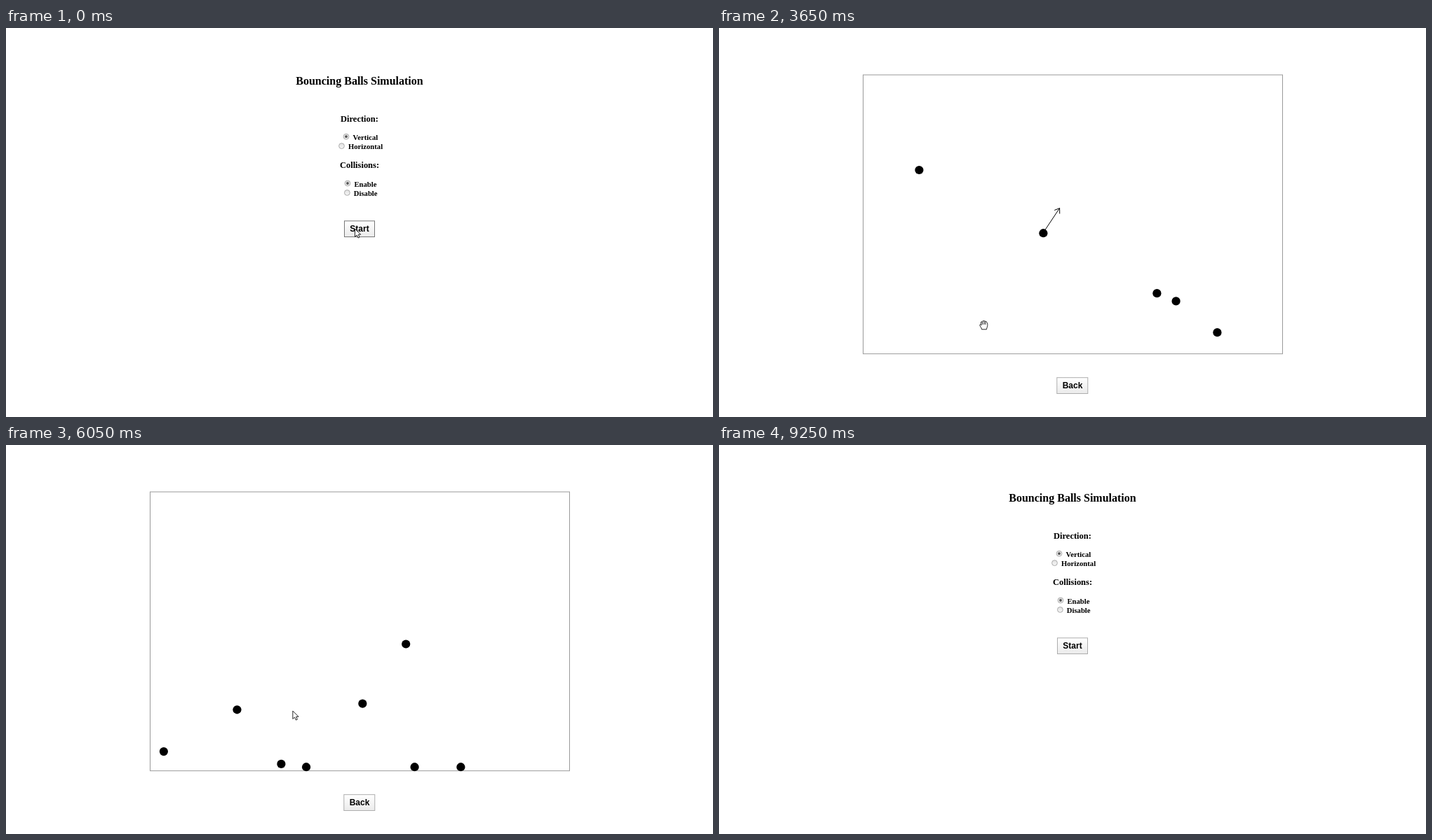
Write an HTML page that moves like this. It is 1008 px wide and 556 px high and loops after 9.9 s.

```html
<!DOCTYPE html>
<html lang="en">
<head>
<meta charset="utf-8">
<title>Bouncing Balls Simulation</title>
<style>
  html, body { margin: 0; width: 100%; height: 100%; overflow: hidden; background: #fff; }
  svg { display: block; width: 1008px; height: 556px; }
  text { font: bold 10.67px "Liberation Serif", "Times New Roman", serif; }
  .title { font-size: 16px; }
  .head { font-size: 12.48px; }
  .mid { text-anchor: middle; }
  .btn text { font: bold 12px "Liberation Sans", Arial, sans-serif; text-anchor: middle; }
  .btn rect { fill: url(#face); stroke: #adadad; }
  .btn.hover rect { stroke: #777; }
  .btn.down rect { fill: #e4e4e4; }
  .radio { fill: url(#knob); stroke: #a2a2a2; stroke-width: .9; }
  .line { fill: none; stroke: #000; }
  .pointer { fill: #fff; stroke: #000; stroke-width: .85; stroke-linejoin: round; }
</style>
</head>
<body>
<svg viewBox="0 0 1008 556">
  <defs>
    <linearGradient id="face" x2="0" y2="1">
      <stop offset="0" stop-color="#fff"/><stop offset="1" stop-color="#ebebeb"/>
    </linearGradient>
    <linearGradient id="knob" x2="0" y2="1">
      <stop offset="0" stop-color="#e2e2e2"/><stop offset="1" stop-color="#f6f6f6"/>
    </linearGradient>
  </defs>

  <g id="menu">
    <text class="title mid" x="504" y="80.5">Bouncing Balls Simulation</text>
    <text class="head mid" x="504" y="134">Direction:</text>
    <text x="494.5" y="160">Vertical</text>
    <text x="488" y="173.4">Horizontal</text>
    <text class="head mid" x="504" y="200">Collisions:</text>
    <text x="496.5" y="226.6">Enable</text>
    <text x="495.8" y="240">Disable</text>
    <g class="radio">
      <circle cx="485" cy="155.2" r="3.9"/><circle cx="478.5" cy="168.6" r="3.9"/>
      <circle cx="487" cy="222" r="3.9"/><circle cx="486.4" cy="235.4" r="3.9"/>
    </g>
    <g fill="#555"><circle cx="485" cy="155.2" r="1.9"/><circle cx="487" cy="222" r="1.9"/></g>
    <g id="start" class="btn">
      <rect x="482.5" y="275.8" width="43" height="22.7"/>
      <text x="504" y="291">Start</text>
    </g>
  </g>

  <g id="sim">
    <rect x="205.5" y="67" width="598" height="398.7" fill="none" stroke="#999"/>
    <g id="back" class="btn">
      <rect x="481.8" y="499.7" width="44" height="22.8"/>
      <text x="504" y="514.8">Back</text>
    </g>
    <g id="balls"></g>
    <path id="aim" class="line"/>
  </g>

  <path id="arrow" class="pointer" d="M0 0V11.4L2.7 9 4.5 13 6.5 12.1 4.8 8.2H8.2Z"/>
  <path id="hand" class="pointer" d="M-3 6.3C-3.2 4-5.8 1.6-5.9 0C-5.8-1.2-4.4-1-3.6.4L-4.2-3.8C-4-5.2-2.6-5-2.3-3.8L-1.8-5.4C-1.3-6.6 0-6.4.2-5.2C.8-6.4 2.2-6 2.3-4.6C3-5.4 4.2-4.9 4.2-3.6L5-2.8C6 2 4.2 3 3.8 6.3ZM-2.3-3.8L-1.6-.6M.2-5.2L.4-.8M2.3-4.6V-.6"/>
</svg>

<script>
const LOOP = 9900, STEP = 50;
const OPEN = 850, CLOSE = 8450, GONE = 9250;
const LEFT = 211, RIGHT = 798, FLOOR = 460;
const G = 953, BOUNCE = .51, GLIDE = .5;   // px/s², speed kept per bounce, seconds
const PULL_X = .2, PULL_Y = .24;           // drag length per launch speed

// One throw each: times in ms, start point, launch speed, where the ball settles
const shots = [
  [1300, 1640, 471.5, 256, 136, -510, 648],
  [1900, 2350, 463, 307, 190, -521, 581],
  [2550, 2850, 420, 330, 255, -320, 425],
  [3100, 3400, 299.5, 333, -58, -640, 226],
  [3480, 4010, 462, 293, 452, -587, 263],
  [4100, 4400, 368, 173, 60, -341, 556],
  [4600, 4800, 390, 330, 70, -121, 372],
  [5400, 5900, 520, 330, 332, -376, 608],
  [6400, 6700, 304.5, 286.5, -36, -517, 240],
  [6900, 7250, 479, 370, 153, -225, 600]
].map(([press, release, x, y, vx, vy, rest]) => ({
  press, release, x, y, vx, vy, rest,
  handX: x - vx * PULL_X, handY: y - vy * PULL_Y
}));

// Cursor stops between throws, joined with both ends of every drag
const stops = [
  [0, 497.5, 287], [1200, 497.5, 287], [1800, 462.5, 307], [5300, 534, 363.5],
  [6850, 479, 363.5], [7950, 524, 532.5], [8450, 504, 508], [9200, 55, 550], [LOOP, 55, 550],
  ...shots.flatMap(s => [[s.press, s.x, s.y], [s.release, s.handX, s.handY]])
].sort((a, b) => a[0] - b[0]);

const $ = id => document.getElementById(id);
const show = (el, on) => el.setAttribute('visibility', on ? 'inherit' : 'hidden');
const move = (el, x, y) => el.setAttribute('transform', `translate(${x} ${y})`);
const mix = (a, b, u) => a + (b - a) * u;
const reflect = x => x > RIGHT ? 2 * RIGHT - x : x < LEFT ? 2 * LEFT - x : x;

const balls = shots.map(() => {
  const c = document.createElementNS('http://www.w3.org/2000/svg', 'circle');
  c.setAttribute('r', 6.1);
  c.setAttribute('cx', .4);
  c.setAttribute('cy', .2);
  return $('balls').appendChild(c);
});

// Height above the floor, s seconds after landing at the given speed
function hopHeight(s, speed) {
  for (speed *= BOUNCE; speed > 20; speed *= BOUNCE) {
    const hop = 2 * speed / G;
    if (s < hop) return speed * s - G / 2 * s * s;
    s -= hop;
  }
  return 0;
}

function ballAt({ release, x, y, vx, vy, rest }, t) {
  const s = Math.max(0, t - release) / 1000;
  const impact = Math.sqrt(vy * vy + 2 * G * (FLOOR - y));
  const land = (impact - vy) / G;
  if (s < land) return [reflect(x + vx * s), y + vy * s + G / 2 * s * s];
  const after = s - land;
  return [
    mix(rest, reflect(x + vx * land), Math.exp(-after / GLIDE)),
    FLOOR - hopHeight(after, impact)
  ];
}

function cursorAt(t, drag) {
  const i = stops.findIndex(s => s[0] > t);
  const a = stops[i - 1], b = stops[i];
  let u = (t - a[0]) / (b[0] - a[0]);
  if (drag) u = 1 - (1 - u) ** 7;
  return [mix(a[1], b[1], u), mix(a[2], b[2], u)];
}

function aimPath({ x, y }, cx, cy) {
  const dx = (x - cx) * .28, dy = (y - cy) * .27;
  const tx = x + dx, ty = y + dy, back = Math.atan2(-dy, -dx);
  const barb = turn => `${tx + 8 * Math.cos(back + turn)} ${ty + 8 * Math.sin(back + turn)}`;
  return `M${x} ${y}L${tx} ${ty}M${barb(.6)}L${tx} ${ty}L${barb(-.6)}`;
}

function draw(t) {
  const running = t >= OPEN && t < CLOSE;
  const drag = shots.find(s => t >= s.press && t < s.release);
  const [cx, cy] = cursorAt(t, drag);
  const over = (top, bottom) => !drag && cx > 481 && cx < 527 && cy >= top && cy <= bottom;
  const style = (id, hover, down) =>
    $(id).setAttribute('class', 'btn' + (hover ? ' hover' : '') + (down ? ' down' : ''));

  show($('menu'), !running);
  show($('sim'), running);
  style('start', over(275, 299), t >= OPEN - STEP && t < OPEN);
  style('back', over(499, 523), t >= CLOSE - STEP);

  shots.forEach((s, i) => {
    show(balls[i], t >= s.press);
    move(balls[i], ...ballAt(s, t));
  });

  show($('aim'), !!drag);
  if (drag) $('aim').setAttribute('d', aimPath(drag, cx, cy));
  show($('hand'), !!drag);
  show($('arrow'), !drag && t < GONE);
  move(drag ? $('hand') : $('arrow'), cx, cy);
}

const begin = performance.now();
function tick() {
  const t = (performance.now() - begin) % LOOP;
  draw(Math.floor(t / STEP) * STEP);
  requestAnimationFrame(tick);
}
draw(0);
requestAnimationFrame(tick);
</script>
</body>
</html>
```
